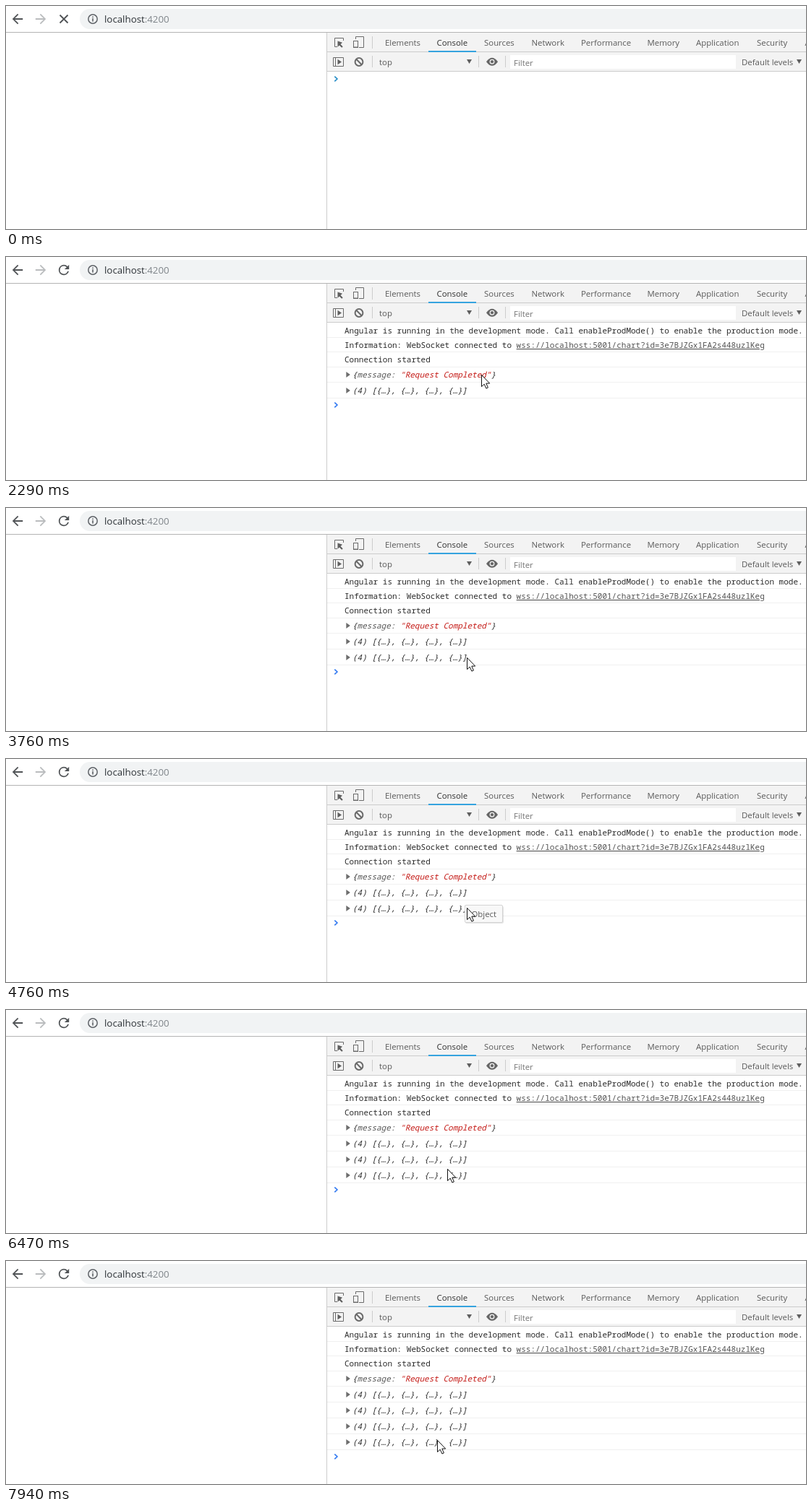
Write an HTML page that moves like this. It is 1106 px wide and 309 px high and loops after 8 s.

```html
<!DOCTYPE html>
<html lang="en">
<head>
<meta charset="utf-8">
<title>Console log</title>
<style>
html, body { margin: 0; width: 100%; height: 100%; overflow: hidden; background: #fff; }
svg { display: block; }
text { white-space: pre; }
.ui { font: 11.4px "Open Sans", "Noto Sans", sans-serif; fill: #5a5a5a; }
.url { font: 13.3px "Open Sans", "Noto Sans", sans-serif; fill: #2c3136; }
.log { font: 11px "Noto Sans Mono", "DejaVu Sans Mono", monospace; fill: #2b2b2b; }
.obj { font-style: italic; }
.icon { fill: none; stroke: #6a6a6a; }
</style>
</head>
<body>
<svg width="1106" height="309" viewBox="0 0 1106 309">
  <defs>
    <path id="arrow" d="M20 11H7.83l5.59-5.59L12 4l-8 8 8 8 1.41-1.41L7.83 13H20z"/>
  </defs>

  <!-- address bar -->
  <use href="#arrow" transform="translate(5.2 7.2) scale(.9)" fill="#505356"/>
  <use href="#arrow" transform="translate(58.8 7.2) scale(-.9 .9)" fill="#babcbe"/>
  <path id="stop" d="M74.5 12.5l11 11m0-11l-11 11" fill="none" stroke="#505356" stroke-width="1.8"/>
  <path id="reload" transform="translate(69.2 7.2) scale(.9)" fill="#505356"
    d="M17.65 6.35A7.96 7.96 0 0 0 12 4a8 8 0 1 0 7.73 10h-2.08A6 6 0 1 1 12 6c1.66 0 3.14.69 4.22 1.78L13 11h7V4z"/>
  <rect x="102" y="4" width="1040" height="28" rx="14" fill="#f1f3f4"/>
  <circle cx="120" cy="18" r="6.2" fill="none" stroke="#5f6368" stroke-width="1.5"/>
  <path d="M120 17v4.4M120 14.4v1.6" stroke="#5f6368" stroke-width="1.6"/>
  <text class="url" x="136" y="23">localhost<tspan fill="#80868b">:4200</tspan></text>
  <rect y="36" width="1106" height="1" fill="#b4b4b4"/>

  <!-- panel bars -->
  <rect x="444" y="37" width="662" height="53" fill="#f3f3f3"/>
  <path d="M444 63.5H1106M444 90.5H1106M443.5 37V309" stroke="#ccc"/>
  <rect x="584" y="62" width="66" height="2" fill="#35a3df"/>
  <path d="M506.5 42V59M506.5 69V85M653.5 69V85M690.5 69V85" stroke="#ccc"/>
  <g id="tabs"></g>

  <path class="icon" d="M458 56.5H454.5V44.5H466.5V48"/>
  <path d="M458.5 48.5v8.2l2.4-2.2 3.3 3.2 1.5-1.5-3.2-3.2 2.6-2.2z" fill="#5f5f5f"/>
  <path class="icon" d="M483.5 46V42.5H494.5V57.5H488"/>
  <rect class="icon" x="480.5" y="48.5" width="6" height="9" fill="#f3f3f3"/>
  <path class="icon" d="M480 48.5h7M480 57h7"/>

  <path class="icon" d="M452.5 71.5h14v12h-14zM455.5 71.5v12"/>
  <path d="M458.5 73.8v7.4l5.5-3.7z" fill="#5f5f5f"/>
  <g class="icon" stroke-width="2"><circle cx="488" cy="77.5" r="5.4"/><path d="M484.3 73.8l7.4 7.4"/></g>
  <text class="ui" x="516" y="82">top</text>
  <path d="M637 74h7l-3.5 6z" fill="#5f5f5f"/>
  <path d="M664 77.2q8-11 16 0q-8 11-16 0z" fill="#666"/>
  <circle cx="672" cy="77.2" r="3.4" fill="#f3f3f3"/>
  <circle cx="672" cy="77.2" r="2.1" fill="#666"/>
  <rect x="697" y="68" width="312" height="19" fill="#fff"/>
  <text class="ui" x="702" y="83" style="fill:#757575">Filter</text>
  <text class="ui" x="1017" y="82">Default levels</text>
  <path d="M1093 74h7l-3.5 6z" fill="#5f5f5f"/>

  <!-- console -->
  <g id="rows"></g>
  <path id="prompt" d="M454.3 -3.4l3.6 3.4l-3.6 3.4" fill="none" stroke-width="1.7"/>
  <g id="tip">
    <rect x="635" y="204" width="53" height="24" rx="2" fill="#000" opacity=".1"/>
    <rect x="634.5" y="202.5" width="52" height="24" rx="1.5" fill="#f8f8f8" stroke="#d4d4d4"/>
    <text class="ui" x="643.5" y="219">Object</text>
  </g>
  <path id="cursor" d="M.5 .5V16.6L4.2 13.2L6.9 19.1L9.4 18L6.8 12.1H11.7z" fill="#fff" stroke="#111"/>
</svg>
<script>
const LOOP = 8000;
const $ = id => document.getElementById(id);

const tabs = { Elements: 524, Console: 595.5, Sources: 661, Network: 726.5, Performance: 795,
  Memory: 886.5, Application: 954, Security: 1038, Audits: 1104.5 };
$("tabs").innerHTML = Object.entries(tabs).map(([name, x]) =>
  `<text class="ui" x="${x}" y="55"${name === "Console" ? ' style="fill:#303030"' : ""}>${name}</text>`).join("");

const list = "(4) [{…}, {…}, {…}, {…}]";
const logs = [
  { at: 210, text: "Angular is running in the development mode. Call enableProdMode() to enable the production mode." },
  { at: 510, text: 'Information: WebSocket connected to <tspan text-decoration="underline" fill="#545454">wss://localhost:5001/chart?id=3e7BJZGx1FA2s448uzlKeg</tspan>' },
  { at: 510, text: "Connection started" },
  { at: 580, obj: true, text: '{<tspan fill="#565656">message:</tspan> <tspan fill="#c41a16">"Request Completed"</tspan>}' },
  ...[1520, 3507, 5493, 7480].map(at => ({ at, obj: true, text: list }))
];
// bottom edge of the first n rows
const edge = n => n < 4 ? [91, 111, 131, 152][n] : 173 + 22 * (n - 4);

$("rows").innerHTML = logs.map(({ obj, text }, i) => {
  const y = edge(i + 1), base = y - (obj ? 6 : i === 2 ? 6 : 5);
  const mark = obj ? `<path d="M470.3 ${base - 8}v8l5.6-4z" fill="#6e6e6e"/>` : "";
  return `<g><rect x="444" y="${y}" width="662" height="1" fill="#f0f0f0"/>${mark}` +
    `<text class="log${obj ? " obj" : ""}" x="${obj ? 479 : 468}" y="${base}">${text}</text></g>`;
}).join("");
const rows = [...$("rows").children];

// pointer moves: step length and [time, x, y] points; it rests between moves
const moves = [
  { step: 76.7, path: [[1900, 732, 292], [2283, 657, 163], [2590, 656, 162]] },
  { step: 77, path: [[3220, 658, 166], [3528, 675, 219], [3759, 637, 207], [3990, 617, 190]] },
  { step: 80, path: [[4070, 614, 188]] },
  { step: 76, path: [[4760, 637, 206], [5140, 672, 256]] },
  { step: 80, path: [[5450, 673, 251], [5930, 663, 204]] },
  { step: 78.3, path: [[6290, 655, 206], [6446, 610, 220], [6760, 606, 229]] },
  { step: 75, path: [[7160, 607, 229], [7310, 606, 229]] },
  { step: 80, path: [[7780, 604, 233], [7940, 596, 248]] }
];

function pointer(time) {
  const move = moves.filter(m => m.path[0][0] <= time).pop();
  if (!move) return null;
  const { step, path } = move, start = path[0][0];
  const t = start + Math.floor((time - start) / step + .02) * step;
  const i = path.findIndex(p => p[0] > t);
  if (i < 0) return path[path.length - 1].slice(1);
  const [t0, x0, y0] = path[i - 1], [t1, x1, y1] = path[i];
  const k = (t - t0) / (t1 - t0);
  return [Math.round(x0 + (x1 - x0) * k), Math.round(y0 + (y1 - y0) * k)];
}

const show = (el, on) => el.setAttribute("visibility", on ? "visible" : "hidden");

function draw(t) {
  show($("stop"), t < 290);
  show($("reload"), t >= 290);
  const count = logs.filter(l => l.at <= t).length;
  rows.forEach((row, i) => show(row, i < count));
  $("prompt").setAttribute("transform", `translate(0 ${edge(count) + 10})`);
  $("prompt").setAttribute("stroke", count ? "#367cf1" : "#2a8fc8");
  show($("tip"), t >= 4070 && t < 4840);
  const pos = pointer(t);
  show($("cursor"), pos);
  if (pos) $("cursor").setAttribute("transform", `translate(${pos})`);
}

const begin = performance.now();
function tick() {
  draw((performance.now() - begin) % LOOP);
  requestAnimationFrame(tick);
}
tick();
</script>
</body>
</html>
```
